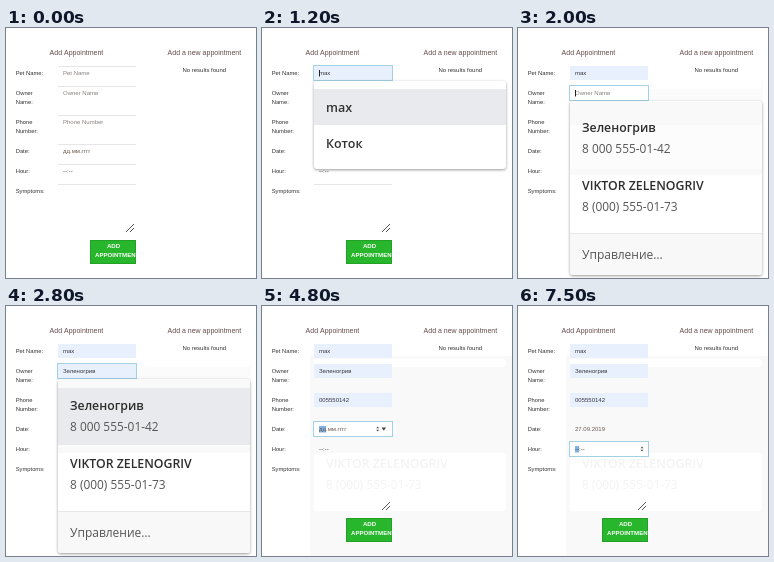
An HTML page with a canvas that plays this animation: 250 by 250 pixels, repeating every 8 s.

```html
<!DOCTYPE html>
<html lang="en">
<head>
<meta charset="utf-8">
<title>Appointment form</title>
<style>
html, body { margin: 0; width: 100%; height: 100%; overflow: hidden; background: #fff; }
canvas { display: block; width: 250px; height: 250px; }
</style>
</head>
<body>
<canvas></canvas>
<script>
const LOOP = 8000;
const SANS = '"Liberation Sans", Arial, sans-serif';
const MENU = '"Open Sans", "Noto Sans", sans-serif';
const BLUE = '#e8f0fe', GHOST = '#f9f9f9', INK = '#333';

const OWNER = 'Зеленогрив', PHONE = '005550142';
const CONTACTS = [
  [OWNER, '8 000 555-01-42'],
  ['VIKTOR ZELENOGRIV', '8 (000) 555-01-73']
];

const canvas = document.querySelector('canvas');
const ratio = window.devicePixelRatio || 1;
canvas.width = canvas.height = 250 * ratio;
const ctx = canvas.getContext('2d');
ctx.scale(ratio, ratio);

function rect(x, y, w, h, color) {
  ctx.fillStyle = color;
  ctx.fillRect(x, y, w, h);
}

function outline(x, y, w, h, color, width = 1) {
  ctx.lineWidth = width;
  ctx.strokeStyle = color;
  ctx.strokeRect(x, y, w, h);
}

function rounded(x, y, w, h, r, color) {
  ctx.beginPath();
  ctx.roundRect(x, y, w, h, r);
  ctx.fillStyle = color;
  ctx.fill();
}

function clipTo(x, y, w, h, paint) {
  ctx.save();
  ctx.beginPath();
  ctx.rect(x, y, w, h);
  ctx.clip();
  paint();
  ctx.restore();
}

function text(str, x, y, { size = 6, color = INK, weight = 400, family = SANS, align = 'left' } = {}) {
  ctx.font = `${weight} ${size}px ${family}`;
  ctx.textAlign = align;
  ctx.fillStyle = color;
  ctx.fillText(str, x, y);
  return ctx.measureText(str).width;
}

function triangle(x, y, halfWidth, height) {
  ctx.beginPath();
  ctx.moveTo(x - halfWidth, y);
  ctx.lineTo(x + halfWidth, y);
  ctx.lineTo(x, y + height);
  ctx.fillStyle = '#444';
  ctx.fill();
}

function spinner(x, y) {
  triangle(x, y - 0.7, 1.4, -1.8);
  triangle(x, y + 0.7, 1.4, 1.8);
}

// caret: 'start', 'end' or nothing; selected: leading part shown as selection
function field(y, { value = '', hint = '', color = INK, filled, focus, caret, selected = '', line }) {
  if (filled) rect(52, y, 78, 14, BLUE);
  else if (focus) rect(52, y, 78, 14, '#fff');
  else if (line) rect(52, y, 78, 1, '#e6e6e6');
  if (focus) outline(51.5, y - 0.5, 79, 15, '#a2d1e6');

  const base = y + 9;
  if (selected) {
    ctx.font = `6px ${SANS}`;
    rect(57, base - 5, ctx.measureText(selected).width, 6.5, '#7fb2e5');
  }
  const width = text(value || hint, 57, base, { color: value ? color : '#85807d' });
  if (caret) rect(caret === 'end' ? Math.round(57 + width) : 57, base - 5, 1, 6.5, '#222');
}

function panel(y, h) {
  ctx.save();
  ctx.shadowColor = 'rgba(0,0,0,.4)';
  ctx.shadowBlur = 3 * ratio;
  ctx.shadowOffsetY = ratio;
  rounded(52, y, 192, h, 3, '#fff');
  ctx.restore();
}

function petMenu(hover) {
  panel(53, 88);
  if (hover) rect(52, 61, 192, 36, '#e8eaed');
  const style = { size: 12.5, weight: 600, family: MENU, color: '#333' };
  text('max', 64, 84, style);
  text('Коток', 64, 120, style);
}

function contactText(index, y, color) {
  const [name, phone] = CONTACTS[index];
  text(name, 64, y, { size: 12.3, weight: 600, family: MENU, color: color || '#2d2d2d' });
  text(phone, 64, y + 21, { size: 11.9, family: MENU, color: color || '#555' });
}

function ownerMenu(hover) {
  panel(73, 174);
  rounded(52, 73, 192, 24, [3, 3, 0, 0], GHOST);
  rect(52, 97, 192, 44, '#fcfcfc');
  rect(52, 141, 192, 6, GHOST);
  if (hover) rect(52, 82, 192, 57, '#e8eaed');
  contactText(0, 104);
  contactText(1, 162);
  rounded(52, 206, 192, 41, [0, 0, 3, 3], '#f8f8f8');
  rect(52, 205, 192, 1, '#e8e8e8');
  text('Управление…', 64, 231, { size: 12, family: MENU, color: '#555' });
}

// Pale trace left behind by the closed menus
function menuTrace(t) {
  if (t < 1500) return;
  if (t < 3000) {
    rect(51, 53, 194, 91, '#fbfbfb');
    rounded(52, 53, 192, 8, 3, '#fff');
    return;
  }
  rect(48, 50, 202, 200, GHOST);
  rounded(52, 53, 192, 8, 3, '#fff');
  rounded(52, 147, 192, 58, 3, '#fff');
  contactText(1, 162, '#f3f3f3');
}

function calendar(hover) {
  rect(52, 131, 66, 50, '#fff');
  clipTo(52, 131, 66, 50, () => {
    text('Сентябрь', 74, 134, { align: 'center' });
    text('2019 -', 74, 139.5, { align: 'center' });
  });
  for (let i = 0; i < 3; i++) {
    rect(94.5 + i * 7.2, 130.5, 6.4, 8, '#e9e9e9');
    text('‹•›'[i], 97.7 + i * 7.2, 136.5, { align: 'center' });
  }
  const column = i => 59.3 + i * 8.55;
  'Пн Вт Ср Чт Пт Сб Вс'.split(' ').forEach((day, i) =>
    text(day, column(i), 147, { size: 6.3, align: 'center' }));

  clipTo(55, 147.5, 60, 30.5, () => {
    for (let cell = 0; cell < 42; cell++) {
      const offset = cell - 6;
      const day = offset < 0 ? 32 + offset : offset % 30 + 1;
      const inMonth = offset >= 0 && offset < 30;
      const x = column(cell % 7), y = 152.6 + Math.floor(cell / 7) * 5.05;
      if (hover && inMonth && day === 27) rect(x - 4.2, y - 4.8, 8.4, 5.3, '#e4eef8');
      if (inMonth && day === 11) outline(x - 4, y - 4.7, 8, 5.2, '#888', 0.6);
      text(day, x, y, { size: 6.3, align: 'center', color: inMonth ? '#222' : '#999' });
    }
  });
  outline(55.5, 147.5, 59, 30, '#5e9fdc');
}

function labels() {
  const title = { size: 7, color: '#674b4b' };
  text('Add Appointment', 43.6, 27, title);
  text('Add a new appointment', 161.6, 27, title);
  text('No results found', 176.4, 44);
  const rows = [
    ['Pet Name:', 47], ['Owner', 67], ['Name:', 76], ['Phone', 96],
    ['Number:', 105], ['Date:', 125], ['Hour:', 145], ['Symptoms:', 165]
  ];
  for (const [label, y] of rows) text(label, 9.7, y, { size: 5.8 });
}

function textareaAndButton(line) {
  if (line) rect(52, 156, 78, 1, '#e6e6e6');
  ctx.lineWidth = 0.9;
  ctx.strokeStyle = '#444';
  ctx.beginPath();
  ctx.moveTo(120, 204);
  ctx.lineTo(128, 196);
  ctx.moveTo(124, 204);
  ctx.lineTo(128, 200);
  ctx.stroke();

  rect(84, 212, 46, 24, '#28b62c');
  outline(84.5, 212.5, 45, 23, '#23a127');
  clipTo(84, 212, 46, 24, () => {
    const style = { size: 6.1, weight: 700, color: '#fff' };
    text('ADD', 107.5, 220, { ...style, align: 'center' });
    text('APPOINTMENT', 89, 229, style);
  });
}

function draw(t) {
  const between = (from, to) => t >= from && t < to;
  const line = t < 3000;
  const dateFocus = between(4000, 7400);
  const hourFocus = t >= 7400;
  const picked = t >= 6400;

  rect(0, 0, 250, 250, '#fff');
  menuTrace(t);
  labels();
  textareaAndButton(line);

  field(38, {
    value: t >= 1200 ? 'max' : '', hint: 'Pet Name', filled: t >= 1200,
    focus: between(800, 1900),
    caret: between(800, 1500) ? 'start' : between(1500, 1900) && 'end', line
  });
  field(58, {
    value: t >= 2300 ? OWNER : '', hint: 'Owner Name', filled: t >= 2300,
    focus: between(1900, 4000),
    caret: between(1900, 2800) ? 'start' : between(3000, 3500) && 'end', line
  });
  field(87, { value: t >= 3000 ? PHONE : '', hint: 'Phone Number', filled: t >= 3000, line });
  field(116, {
    value: picked ? '27.09.2019' : 'дд.мм.гггг', focus: dateFocus, color: '#6b5853',
    selected: dateFocus ? (picked ? '27' : 'дд') : '', line
  });
  field(136, { value: '--:--', focus: hourFocus, selected: hourFocus ? '--' : '', line });

  if (between(3700, 7400)) {
    spinner(115.7, 123);
    triangle(121.8, 121.4, 2.3, 3.4);
  }
  if (hourFocus) spinner(124, 143);

  if (between(800, 1500)) petMenu(t >= 1200);
  if (between(1900, 3000)) {
    ctx.globalAlpha = t < 2000 ? 0.6 : 1;
    ownerMenu(t >= 2300);
    ctx.globalAlpha = 1;
  }
  if (between(5200, 6400)) calendar(t >= 5700);
}

const start = performance.now();
function tick() {
  draw((performance.now() - start) % LOOP);
  requestAnimationFrame(tick);
}
tick();
</script>
</body>
</html>
```
